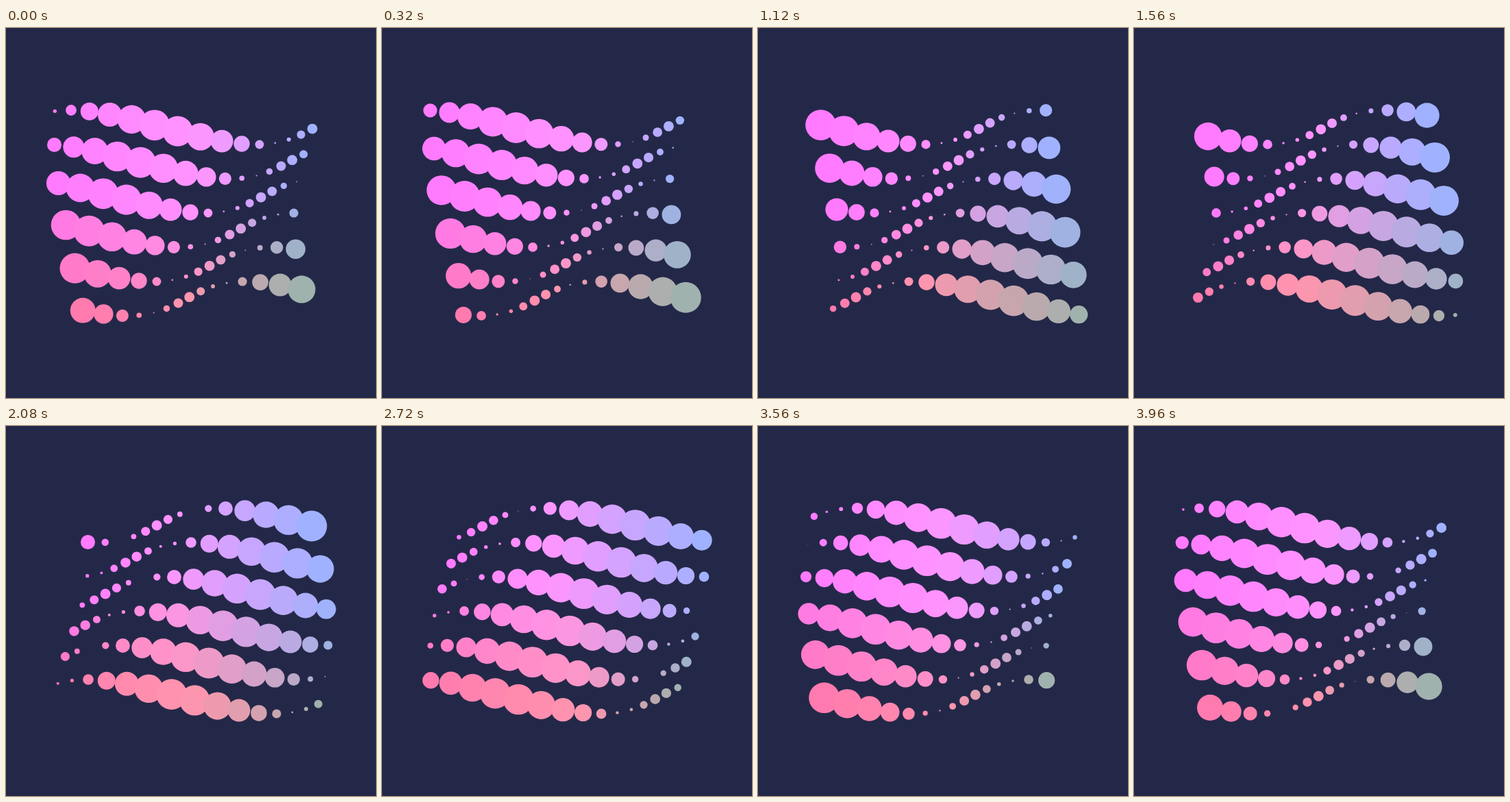
An HTML page with a canvas for the animation above (4 s loop, 540x540 px).

```html
<!DOCTYPE html>
<html lang="en">
<head>
<meta charset="utf-8">
<title>Dot wave</title>
<style>
  html, body { margin: 0; width: 100%; height: 100%; overflow: hidden; background: #242848; }
  canvas { display: block; width: 540px; height: 540px; }
</style>
</head>
<body>
<canvas id="stage" width="540" height="540"></canvas>
<script>
  const ctx = document.getElementById('stage').getContext('2d');
  const SIZE = 540, LOOP = 4000;
  const COLS = 15, ROWS = 6;
  const COL_PHASE = 0.354, ROW_PHASE = 0.531, START_PHASE = -1.9;
  const SWING = 25;

  const dots = [];
  for (let row = 0; row < ROWS; row++) {
    for (let col = 0; col < COLS; col++) {
      const red = Math.min(255, 342 - 13 * col);
      const green = 122 + 4 * col;
      const blue = Math.min(255, 304 - 26 * row);
      dots.push({
        x: 95 + 25 * col,
        y: 145 + 50 * row,
        phase: START_PHASE + COL_PHASE * col + ROW_PHASE * row,
        color: `rgb(${red}, ${green}, ${blue})`
      });
    }
  }

  function draw(time) {
    const turn = (time % LOOP) / LOOP * 2 * Math.PI;
    ctx.fillStyle = '#242848';
    ctx.fillRect(0, 0, SIZE, SIZE);
    for (const dot of dots) {
      const angle = dot.phase + turn;
      const shift = SWING * Math.sin(angle);
      // The scale passes through zero, so the far side shows a small mirrored dot.
      const radius = Math.abs(7.5 + 15 * Math.cos(angle));
      ctx.fillStyle = dot.color;
      ctx.beginPath();
      ctx.arc(dot.x + shift, dot.y + shift, radius, 0, 2 * Math.PI);
      ctx.fill();
    }
  }

  function tick(now) {
    draw(now);
    requestAnimationFrame(tick);
  }

  draw(0);
  requestAnimationFrame(tick);
</script>
</body>
</html>
```
